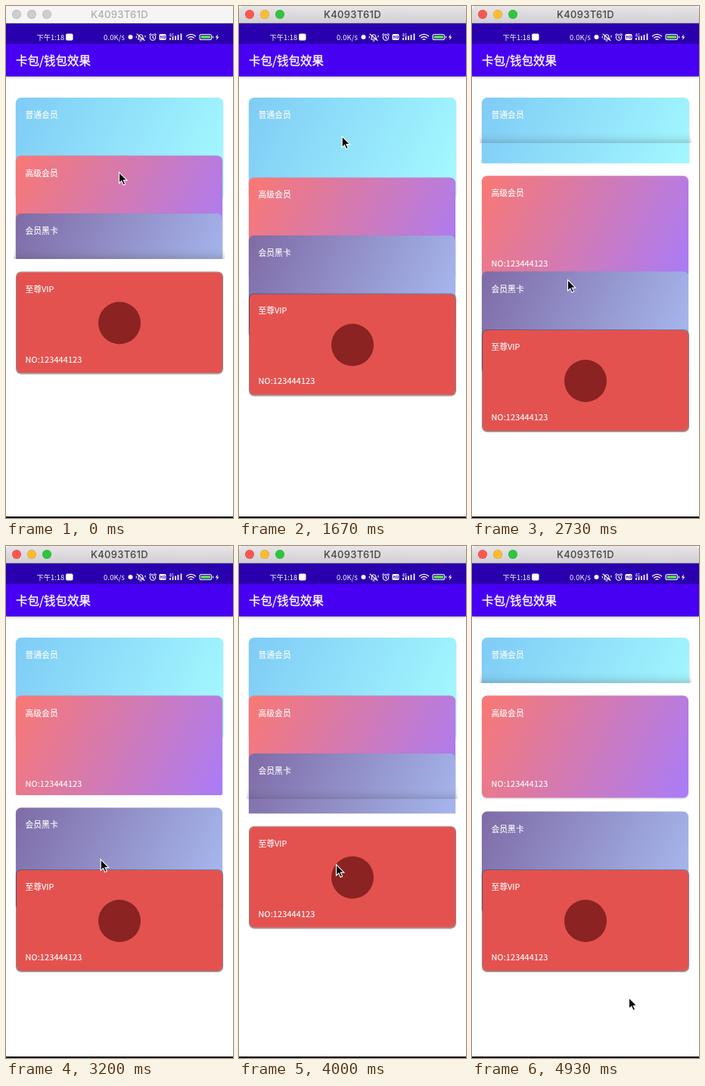
Recreate the animation shown at these times as an HTML page. Size 300x676 px, loop 4.99 s.

```html
<!DOCTYPE html>
<html lang="zh-CN">
<head>
<meta charset="utf-8">
<title>卡包/钱包效果</title>
<style>
  html, body { margin: 0; width: 100%; height: 100%; overflow: hidden; background: #fff; }
  body { position: relative; color: #fff; font-family: "Noto Sans CJK SC", "Noto Sans CJK", "Noto Sans", sans-serif; }
  #stage { position: absolute; left: 0; top: 0; width: 300px; height: 676px; overflow: hidden; background: #fff; }
  #stage > * { position: absolute; }
  .window { left: 0; top: 0; width: 300px; height: 22px; background: #f5f5f5; color: #adadad;
    border-bottom: 1px solid #d4d2d6; border-radius: 5px 5px 0 0;
    font: 500 13px/23px Inter, "Liberation Sans", sans-serif; letter-spacing: .3px; text-align: center; }
  .window i { position: absolute; top: 5px; width: 12px; height: 12px; border-radius: 50%; background: #cfcecf;
    box-shadow: inset 0 0 0 .7px rgba(0,0,0,.12); }
  .window.active { background: linear-gradient(#e7e5e7, #d2d0d2); color: #454445; border-color: #a5a2aa; }
  .window.active i { background: var(--on); }
  .status { left: 0; top: 23px; width: 300px; height: 27px; background: #2a00ae; }
  .header { left: 0; top: 50px; width: 300px; height: 43px; background: #4800f2; box-shadow: 0 1px 3px rgba(0,0,0,.3);
    font-size: 15.5px; font-weight: 500; line-height: 42px; text-indent: 13px; white-space: nowrap;
    -webkit-text-stroke: .3px #fff; }
  .icons { left: 0; top: 0; }
  .floor { left: 0; top: 674px; width: 300px; height: 2px; background: #0b0b0b; }
  .card { left: 13px; top: 0; width: 273px; height: 135px; box-sizing: border-box; border-radius: 7px;
    box-shadow: 0 1px 2px rgba(0,0,0,.22); font-size: 10.8px; line-height: 16px; white-space: nowrap;
    -webkit-text-stroke: .15px #fff; }
  .card:first-of-type { width: 274px; }
  .card span { position: absolute; left: 12.5px; top: 14px; }
  .card span.no { top: 106.5px; letter-spacing: .18px; }
  .card .shade { position: absolute; left: -3px; right: -3px; top: 46px; height: 14px; opacity: 0;
    background: linear-gradient(rgba(60,60,60,0), rgba(60,60,60,.06) 50%, rgba(60,60,60,.2)); }
  .card .mark { position: absolute; left: 109px; top: 40px; width: 56px; height: 56px; border-radius: 50%; background: #8a2321; }
  .card.vip { width: 274px; border: 1px solid rgba(50,50,50,.4); background-clip: padding-box;
    box-shadow: 0 1px 1px rgba(0,0,0,.25); }
  .card.vip > * { margin: -1px 0 0 -1px; }
  .pointer { left: 0; top: 0; }
</style>
</head>
<body>
<div id="stage">
  <section class="floor"></section>
  <header class="header">卡包/钱包效果</header>
  <section class="status"></section>
  <svg class="icons" width="300" height="52" fill="none" stroke="#fff" stroke-width="1.1" stroke-linecap="round" stroke-linejoin="round">
    <g fill="#fff" stroke="none" font-size="9.3" font-weight="500">
      <text x="40.5" y="44.5">下午1:18</text>
      <rect x="79" y="36.5" width="9.5" height="9" rx="2"/>
      <text x="129" y="44.5" letter-spacing=".2">0.0K/s</text>
      <circle cx="164.5" cy="41" r="3"/>
      <rect x="202.5" y="37" width="9" height="8" rx="1.5"/>
      <text x="203.6" y="43.2" font-size="5" font-weight="700" fill="#2a00ae">HD</text>
      <text x="215.5" y="40.5" font-size="5.5">4G</text>
    </g>
    <path d="M174.5 44h7.5c-1.3-1.3-1-2.5-1.2-4a2.7 2.7 0 0 0-5.3 0c-.1 1.5.2 2.7-1 4M177 46h2M173 37l10 8.5M172.3 40v2M184 39v2"/>
    <circle cx="194" cy="41.5" r="3.7"/>
    <path d="M194 39.5v2.2l1.5 1M189.5 38.2l1.8-1.5M198.5 38.2l-1.8-1.5"/>
    <path stroke-width="1.7" stroke-linecap="butt" d="M217 45v-3M220.5 45v-4M224 45v-5.5M227.5 45v-7M231.5 45v-8.5"/>
    <path stroke-width="1.3" d="M238.5 39.8a8.500 8.500 0 0 1 12 0M240.700 42a5.500 5.500 0 0 1 7.600 0M243 44.200a2.300 2.300 0 0 1 3 0"/>
    <rect x="256" y="37.5" width="15.5" height="7" rx="2"/>
    <path d="M273.5 40v2"/>
    <rect x="257.5" y="39" width="12.5" height="4" rx=".8" fill="#53d657" stroke="none"/>
    <path d="M279.8 37.5l-3 4h2l-.6 3.5 3.2-4.3h-2.1z" fill="#fff" stroke="none"/>
  </svg>
  <section class="window">
    <i style="left:8px;--on:#fc5650"></i><i style="left:28px;--on:#fdbc30"></i><i style="left:48px;--on:#2fc540"></i>
    K4093T61D
  </section>
</div>
<script>
  const LOOP = 4990, FPS = 15;
  const TOP = 121, STEP = 76.5, GAP = 16.5, HEIGHT = 135;
  const SLIDE = 300, ACTIVE_AT = 1330;

  const kinds = [
    { name: '普通会员', fill: 'linear-gradient(116deg, #7fcbf6, #a6fbff)' },
    { name: '高级会员', fill: 'linear-gradient(116deg, #f97873, #a97cf9)' },
    { name: '会员黑卡', fill: 'linear-gradient(116deg, #7f6ba6, #a9bdf3)' },
    { name: '至尊VIP', fill: '#e4524f', vip: true }
  ];

  // [time, opened card]
  const picks = [[-SLIDE, 3], [1540, 0], [2554, 1], [3150, 2], [3800, 3], [4432, 1]];

  // [time, x, y] of the pointer tip
  const path = [
    [0, 149, 219], [330, 150, 228], [800, 168, 372], [1000, 169, 380], [1130, 168, 372],
    [1400, 140, 175], [1650, 136, 168], [2000, 129, 243], [2500, 126, 322], [2733, 126, 361],
    [3150, 125, 402], [3450, 123, 470], [3667, 123, 483], [3900, 123, 478], [4300, 143, 246],
    [4467, 143, 236], [4560, 145, 250], [4800, 190, 530], [4933, 207, 596]
  ];

  const stage = document.getElementById('stage');
  const win = document.querySelector('.window');

  function add(parent, tag, cls, text = '') {
    const el = document.createElement(tag);
    el.className = cls;
    el.textContent = text;
    return parent.appendChild(el);
  }

  const cards = kinds.map(kind => {
    const el = add(stage, 'div', kind.vip ? 'card vip' : 'card');
    el.style.backgroundImage = kind.vip ? 'none' : kind.fill;
    if (kind.vip) el.style.backgroundColor = kind.fill;
    add(el, 'span', '', kind.name);
    add(el, 'span', 'no', 'NO:123444123');
    if (kind.vip) add(el, 'div', 'mark');
    return { el, shade: add(el, 'div', 'shade') };
  });

  stage.insertAdjacentHTML('beforeend',
    `<svg class="pointer" width="16" height="22" viewBox="-2 -2 16 22">
      <path d="M0 0v14.5l3.3-3 2.3 5.2 2.5-1.1-2.3-5h4.6z" fill="#000" stroke="#fff" stroke-width="1.1"/>
    </svg>`);
  const pointer = stage.querySelector('.pointer');

  const lastIndex = (rows, t) => rows.findLastIndex(row => row[0] <= t);
  const mix = (a, b, p) => a + (b - a) * p;
  const ease = p => (1 - Math.cos(Math.PI * p)) / 2;
  const restTop = (i, open) => TOP + STEP * (i + (i > open ? 1 : 0));

  function drawCards(t) {
    const n = lastIndex(picks, t);
    const [start, open] = picks[n];
    const before = n ? picks[n - 1][1] : open;
    const p = ease(Math.min(1, (t - start) / SLIDE));
    const tops = cards.map((_, i) => mix(restTop(i, before), restTop(i, open), p));

    cards.forEach(({ el, shade }, i) => {
      const cut = i === open - 1;
      const shown = cut ? tops[i + 1] - GAP - tops[i] : HEIGHT;
      el.style.transform = `translateY(${tops[i]}px)`;
      el.style.clipPath = cut ? `inset(-4px -4px ${HEIGHT - shown}px -4px)` : 'none';
      shade.style.opacity = cut && p > .1 ? Math.min(1, p * 1.6) : 0;
    });
  }

  function drawPointer(t) {
    const n = lastIndex(path, t);
    const a = path[n], b = path[n + 1] || a;
    const p = a === b ? 0 : (t - a[0]) / (b[0] - a[0]);
    pointer.style.transform = `translate(${mix(a[1], b[1], p) - 1.5}px, ${mix(a[2], b[2], p) - 1.5}px)`;
  }

  function draw(ms) {
    const t = Math.floor((ms % LOOP + 5) * FPS / 1000) * 1000 / FPS;
    win.classList.toggle('active', t >= ACTIVE_AT);
    drawCards(t);
    drawPointer(t);
  }

  const begin = performance.now();
  function tick() {
    draw(performance.now() - begin);
    requestAnimationFrame(tick);
  }
  tick();
</script>
</body>
</html>
```
